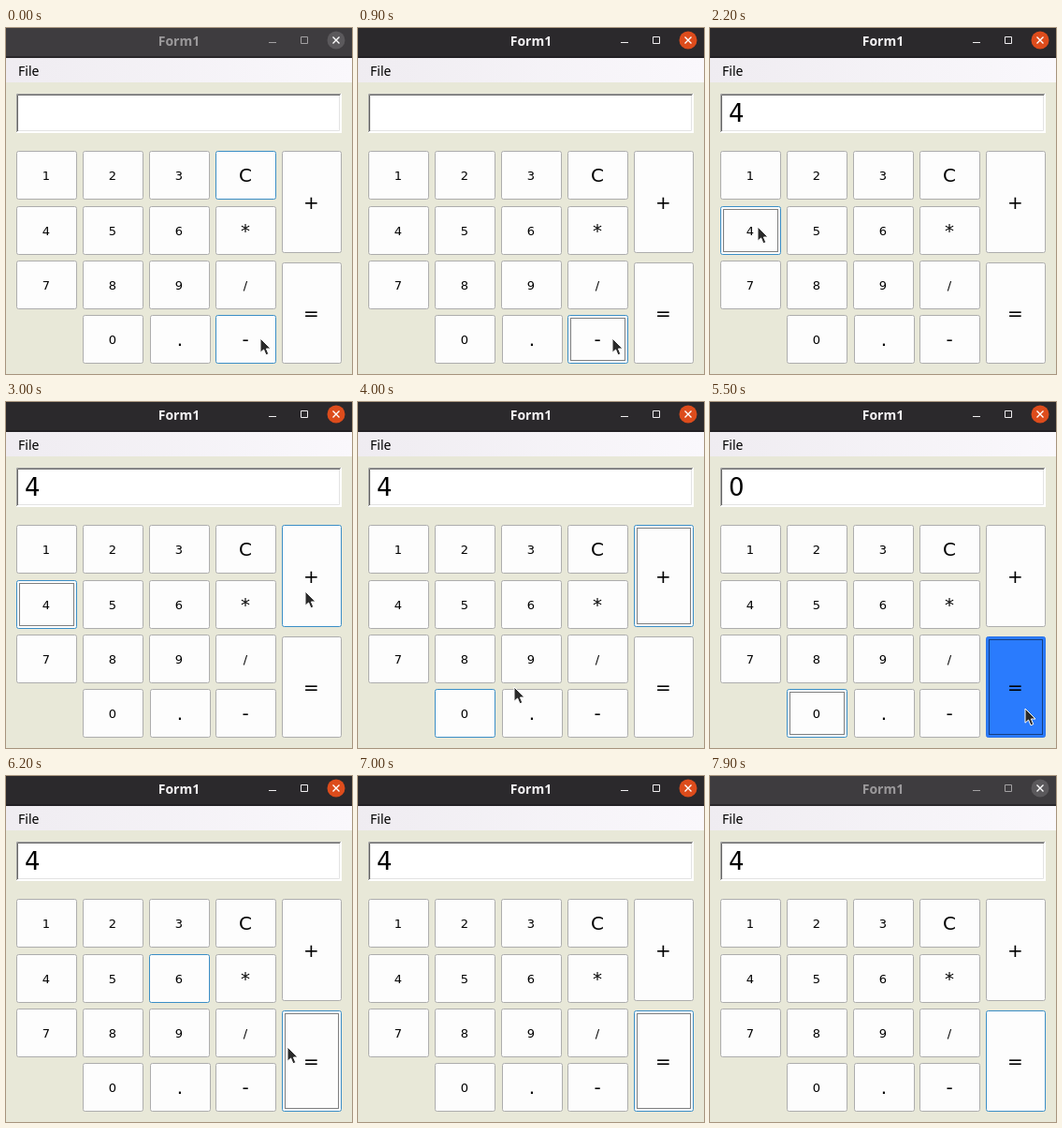
An HTML page for the animation above (8.1 s loop, 370 px wide and 369 px high).

```html
<!DOCTYPE html>
<html lang="en">
<head>
<meta charset="utf-8">
<title>Calculator</title>
<style>
  html, body { margin: 0; width: 100%; height: 100%; overflow: hidden; background: #e8e8d8; }
  svg { display: block; width: 370px; height: 369px; }
  text { font-family: "DejaVu Sans", sans-serif; fill: #000; }
  .ui { font-family: "Noto Sans", "Open Sans", sans-serif; font-size: 14px; }
  .title { font-weight: 700; text-anchor: middle; fill: #9b999b; }
  .bar { fill: #3e3c3f; }
  .icon { fill: none; stroke: #a3a1a3; }
  .close { fill: #5b595c; }
  .active .title { fill: #f4f2f4; }
  .active .bar { fill: #2b292c; }
  .active .icon { stroke: #f0eef0; }
  .active .close { fill: #dd4c1c; }
  .key text { text-anchor: middle; }
  .face { fill: #fdfdfd; stroke: #adadad; }
  .lit .face { stroke: #3b8ec6; }
  .down .face { fill: #2a7bfd; stroke: #2a74e8; }
  .dots { fill: none; stroke: #000; stroke-dasharray: 1 1; visibility: hidden; }
  .focus .dots, .down .dots { visibility: visible; }
</style>
</head>
<body>
<svg id="win" viewBox="0 0 370 369">
  <defs>
    <linearGradient id="menu">
      <stop offset="0" stop-color="#efecf1"/>
      <stop offset="1" stop-color="#faf8fc"/>
    </linearGradient>
  </defs>
  <rect width="370" height="369" fill="#e8e8d8"/>
  <rect class="bar" width="370" height="32"/>
  <rect y="30" width="370" height="2" fill="#1d1b1e" opacity=".6"/>
  <text class="ui title" x="185" y="19">Form1</text>
  <path class="icon" d="M281 15.5h8M315.5 9.5h7v7h-7z"/>
  <circle class="close" cx="353" cy="13" r="9.5"/>
  <path d="M349.5 9.5l7 7m0-7l-7 7" stroke="#fff" stroke-width="1.4"/>
  <rect y="32" width="370" height="26" fill="url(#menu)"/>
  <text class="ui" x="13" y="51">File</text>
  <rect x="11" y="70" width="348" height="42" fill="#fff"/>
  <path d="M11.5 111V70.5H358" fill="none" stroke="#a0a0a0"/>
  <path d="M12.5 110V71.5H357" fill="none" stroke="#696969"/>
  <path d="M13 109.5H356.5V72" fill="none" stroke="#e3e3e3"/>
  <text id="display" x="20" y="100" font-size="26"></text>
  <g id="keys"></g>
  <path id="cursor" d="M0 0V15.2L3.6 12L6 17.8L8.8 16.6L6.4 11H11Z" fill="#2a2a2a" stroke="#fff" stroke-linejoin="round"/>
</svg>
<script>
const LOOP = 8100, STEP = 100;
const $ = id => document.getElementById(id);
const cols = [11, 82, 153, 224, 295], rows = [131, 190, 248, 306];
const keys = {};

function addKey(label, x, y, w = 65, h = 52) {
  const size = /[\d/]/.test(label) ? 13 : 20;
  const g = document.createElementNS("http://www.w3.org/2000/svg", "g");
  g.innerHTML =
    `<rect class="face" x="${x + .5}" y="${y + .5}" width="${w - 1}" height="${h - 1}" rx="2"/>` +
    `<rect class="dots" x="${x + 3.5}" y="${y + 3.5}" width="${w - 7}" height="${h - 7}"/>` +
    `<text x="${x + w / 2 - .5}" y="${Math.round(y + h / 2 + size * .364)}" font-size="${size}">${label}</text>`;
  $("keys").append(g);
  keys[label] = { g, x, y, w, h };
}

["123C", "456*", "789/", " 0.-"].forEach((line, r) =>
  [...line].forEach((label, c) => {
    if (label !== " ") addKey(label, cols[c] + (label === "."), rows[r]);
  }));
addKey("+", cols[4], 131, 64, 109);
addKey("=", cols[4], 250, 64, 108);

const keyAt = ([x, y]) => Object.keys(keys).find(label => {
  const k = keys[label];
  return x >= k.x && x < k.x + k.w && y >= k.y && y < k.y + k.h;
});

let state = { t: 0, pos: [272, 331], hover: "-", focus: "C", down: "", text: "", active: false };
const timeline = [state];
const at = (t, change) => timeline.push(state = { ...state, t, ...change });

// The highlight runs one step ahead of the drawn pointer.
const move = (t, ...path) => path.forEach((pos, i) =>
  at(t + i * STEP, { pos, hover: keyAt(path[i + 1] || pos) }));

at(700, { active: true });
at(800, { down: "-" });
at(900, { down: "", focus: "-" });
move(1300, [258, 323], [214, 297], [155, 267], [103, 240], [66, 220], [51, 212]);
at(2200, { focus: "4", text: "4" });
move(2600, [80, 212], [148, 210], [226, 207], [292, 204], [320, 202]);
at(3400, { focus: "+" });
move(3800, [294, 222], [231, 264], [167, 304], [127, 326], [116, 332]);
at(4400, { down: "0" });
at(4500, { focus: "0" });
at(4800, { down: "", text: "0" });
move(4900, [142, 332], [204, 331], [272, 329], [322, 328], [337, 327]);
at(5500, { down: "=" });
at(5600, { down: "", focus: "=", text: "4" });
move(6200, [301, 289], [211, 191], [126, 99], [95, 66]);
move(6800, [80, 40], [51, 6]);
at(7000, { pos: null, hover: "" });
at(7900, { active: false });

let shown;
function draw(s) {
  $("win").classList.toggle("active", s.active);
  $("display").textContent = s.text;
  $("cursor").style.display = s.pos ? "" : "none";
  if (s.pos) $("cursor").setAttribute("transform", `translate(${s.pos})`);
  for (const label in keys) {
    const list = keys[label].g.classList;
    list.add("key");
    list.toggle("lit", label === s.hover || label === s.focus);
    list.toggle("focus", s.active && label === s.focus);
    list.toggle("down", label === s.down);
  }
}

function tick() {
  const t = performance.now() % LOOP;
  const now = timeline.findLast(s => s.t <= t);
  if (now !== shown) draw(shown = now);
  requestAnimationFrame(tick);
}
tick();
</script>
</body>
</html>
```
